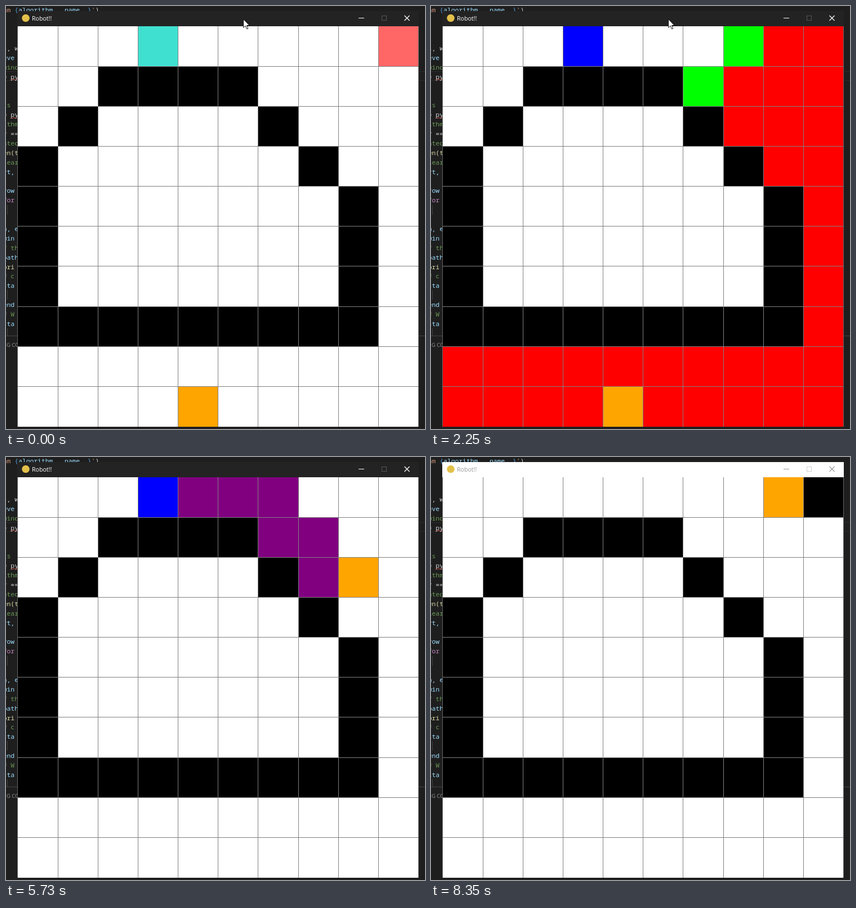
An HTML page for the animation above (8.41 s loop, 744x752 px).

```html
<!DOCTYPE html>
<html lang="en">
<head>
<meta charset="utf-8">
<title>Grid robot</title>
<style>
  html, body { margin: 0; width: 100%; height: 100%; overflow: hidden; background: #1e1e1e; }
  svg { display: block; position: absolute; left: 0; top: 0; }
  .code { font: 11.38px "Noto Sans Mono", "DejaVu Sans Mono", monospace; white-space: pre; }
  .tab { font: 9.5px "Open Sans", "Noto Sans", sans-serif; fill: #969696; }
  .title { font: 10.6px "Open Sans", "Noto Sans", sans-serif; }
</style>
</head>
<body>
<svg id="stage" width="744" height="752" viewBox="0 0 744 752">
  <rect width="744" height="752" fill="#1e1e1e"/>
  <path d="M0 116.5H744M0 132.5H744" stroke="#2c2c2c"/>
  <path d="M0 586.5H744" stroke="#444"/>
  <path d="M2.5 354V371M2.5 505V522M2.5 573V586" stroke="#404040"/>
  <g id="code" class="code"></g>
  <path d="M8 132l2-2 2 2 2-2 2 2 2-2 2 2M8 200l2-2 2 2 2-2 2 2 2-2 2 2" fill="none" stroke="#c4594f"/>
  <text class="tab" x="-6" y="606">UG CONSOLE</text>

  <rect id="bar" x="20" y="9" width="713" height="27"/>
  <circle cx="35" cy="21.5" r="6.8" fill="#e3c04a"/>
  <text id="title" class="title" x="46" y="26">Robot!!</text>
  <path id="min" d="M626 21.5H636"/>
  <rect id="max" x="667.5" y="17.5" width="8" height="8" fill="none"/>
  <path id="close" d="M707.5 17L716.5 26M716.5 17L707.5 26" stroke-width="1.2"/>

  <rect x="20" y="36" width="713" height="712" fill="#666"/>
  <rect x="21" y="36" width="711" height="712" fill="#808080"/>
  <g id="cells" shape-rendering="crispEdges"></g>
  <path id="cursor" d="M0 0V15L3.4 11.8L5.9 17.4L8.2 16.4L5.8 11H10.4Z"
        fill="#fff" stroke="#000" stroke-width=".9"/>
</svg>
<script>
(() => {
const LOOP = 8410, N = 10;
const SVG = 'http://www.w3.org/2000/svg';
const $ = id => document.getElementById(id);
const add = (parent, tag, attrs, text) => {
  const el = document.createElementNS(SVG, tag);
  for (const k in attrs) el.setAttribute(k, attrs[k]);
  if (text) el.textContent = text;
  return parent.appendChild(el);
};

// Editor behind the window: rows of text cut off by its left edge
const INK = { w: '#d4d4d4', g: '#6a9955', b: '#9cdcfe', p: '#c586c0', y: '#dcdcaa' };
const LINES = [
  [4, 'w', 's, w'], [5, 'b', ' eve'], [6, 'g', 'wind'], [7, 'w', '= py'],
  [10, 'g', 'ts'], [11, 'w', '= py'], [12, 'g', 'ithm'], [13, 'w', 'r =='],
  [14, 'g', 'ated'], [15, 'y', 'en(t'], [16, 'g', 'lear'], [17, 'b', 'rt,'],
  [19, 'b', ' row'], [20, 'p', ' for'], [23, 'b', 'n, e'], [24, 'b', ' win'],
  [25, 'g', 'f th'], [26, 'b', 'path'], [27, 'y', ' pri'], [28, 'g', ' # c'],
  [29, 'b', ' sta'], [31, 'b', ' end'], [32, 'g', ' # W'], [33, 'b', ' sta']
];
const firstLine = add($('code'), 'text', { x: -5.3, y: 10.5 });
[['am ', '#ce9178'], ['{', '#569cd6'], ['algorithm.__name__', '#9cdcfe'],
 ['}', '#569cd6'], ["'", '#ce9178'], [')', '#d4d4d4']]
  .forEach(([s, fill]) => add(firstLine, 'tspan', { fill }, s));
for (const [row, ink, s] of LINES)
  add($('code'), 'text', { x: -5.3, y: (11.2 + row * 16.9).toFixed(1), fill: INK[ink] }, s);

// Board
const MAP = [
  '..........',
  '..####....',
  '.#....#...',
  '#......#..',
  '#.......#.',
  '#.......#.',
  '#.......#.',
  '#########.',
  '..........',
  '..........'
].join('');
const WHITE = '#fff', BLACK = '#000', RED = '#f00', GREEN = '#0f0', BLUE = '#00f',
      PURPLE = '#800080', ORANGE = '#ffa500', LOADED = '#305070',
      TURQUOISE = '#40e0d0', SALMON = '#ff6666';
const at = (row, col) => row * N + col;
const HOME = at(9, 4), PARCEL = at(0, 3), PICKUP = at(0, 4), DROP = at(0, 9);

const edge = (start, k) => Math.floor(start + 71.17 * k);
const cells = [...MAP].map((_, i) => {
  const c = i % N, r = Math.floor(i / N);
  const x = edge(20.9, c) + 1, y = edge(35.9, r) + 1;
  return add($('cells'), 'rect', {
    x, y,
    width: edge(20.9, c + 1) - x,
    height: edge(35.9, r + 1) - y + (r === N - 1 ? 1 : 0)
  });
});

function neighbours(i) {
  const c = i % N, list = [];
  if (c < N - 1) list.push(i + 1);
  if (c > 0) list.push(i - 1);
  list.push(i + N, i - N);
  return list.filter(n => MAP[n] === '.');
}

// Breadth-first search: visits in order, each with the cells it opens, and the route
function search(start, goal) {
  const from = { [start]: -1 }, queue = [start], visits = [];
  while (queue.length) {
    const cell = queue.shift();
    const opened = neighbours(cell).filter(n => !(n in from));
    opened.forEach(n => { from[n] = cell; queue.push(n); });
    visits.push({ cell, opened });
    if (cell === goal) break;
  }
  const route = [];
  for (let i = from[goal]; i !== start; i = from[i]) route.unshift(i);
  return { start, goal, visits, route };
}

// Each trip: [time, count] steps for scanning, tracing and walking
const TRIPS = [
  {
    ...search(HOME, PARCEL), begin: 580, clear: 4410, robot: ORANGE,
    scan: [[580, 1], [1450, 20], [1630, 24], [1780, 25], [2250, 34], [2490, 40]],
    trace: [[2550, 1], [2610, 2], [2720, 3], [3080, 7], [3230, 8], [3500, 11],
            [3990, 16], [4080, 17], [4230, 18], [4320, 19]],
    walk: [[4510, 1], [5000, 6], [5090, 7], [5240, 8], [5730, 13], [6000, 16], [6270, 19]]
  },
  {
    ...search(PICKUP, DROP), begin: 6390, clear: 7540, robot: LOADED,
    scan: [[6510, 1], [6970, 10], [7070, 12], [7130, 13]],
    trace: [[7210, 1], [7450, 4]],
    walk: [[7620, 1], [7760, 2], [7850, 3], [7940, 4]]
  }
];
const DROPPED = 7940, BLURRED = 8350;

function mix(keys, t, k) {
  const last = keys[keys.length - 1];
  if (t >= last[0]) return last[k];
  const i = keys.findIndex(key => key[0] > t);
  const a = keys[i - 1], b = keys[i];
  return a[k] + (b[k] - a[k]) * (t - a[0]) / (b[0] - a[0]);
}
const count = (keys, t) => t < keys[0][0] ? 0 : Math.floor(mix(keys, t, 1) + 1e-6);

function board(t) {
  const color = [...MAP].map(m => m === '#' ? BLACK : WHITE);
  if (t < TRIPS[0].clear) color[DROP] = SALMON;
  if (t < TRIPS[0].begin) {
    color[PARCEL] = TURQUOISE;
    color[HOME] = ORANGE;
    return color;
  }
  const trip = TRIPS[t < TRIPS[1].begin ? 0 : 1];
  const { start, goal, visits, route } = trip;
  color[goal] = BLUE;
  let robot = start;
  if (t < trip.clear) {
    for (const { cell, opened } of visits.slice(0, count(trip.scan, t))) {
      color[cell] = RED;
      opened.forEach(n => { if (n !== goal) color[n] = GREEN; });
    }
    route.slice(0, count(trip.trace, t)).forEach(i => { color[i] = PURPLE; });
  } else {
    const steps = count(trip.walk, t);
    if (steps) robot = route[steps - 1];
    route.slice(steps).forEach(i => { color[i] = PURPLE; });
  }
  color[robot] = t < DROPPED ? trip.robot : ORANGE;
  if (t >= DROPPED) color[DROP] = BLACK;
  return color;
}

// Pointer: [time, x, y], leaving through the bottom
const POINTER = [[0, 421.7, 23.5], [3370, 421.7, 23.5], [3440, 427, 38], [3500, 428, 87],
                 [3590, 438, 240], [3690, 452, 470], [3790, 462, 718], [3830, 466, 770]];

function drawBar(active) {
  $('bar').setAttribute('fill', active ? '#232323' : '#fff');
  $('title').setAttribute('fill', active ? '#fff' : '#999');
  $('min').setAttribute('stroke', active ? '#fff' : '#999');
  $('max').setAttribute('stroke', active ? '#555' : '#d0d0d0');
  $('close').setAttribute('stroke', active ? '#fff' : '#999');
}

function draw(t) {
  board(t).forEach((fill, i) => cells[i].setAttribute('fill', fill));
  $('cursor').setAttribute('transform', `translate(${mix(POINTER, t, 1)} ${mix(POINTER, t, 2)})`);
  drawBar(t < BLURRED);
}

const began = performance.now();
function tick() {
  draw(Math.max(0, performance.now() - began) % LOOP);
  requestAnimationFrame(tick);
}
tick();
})();
</script>
</body>
</html>
```
